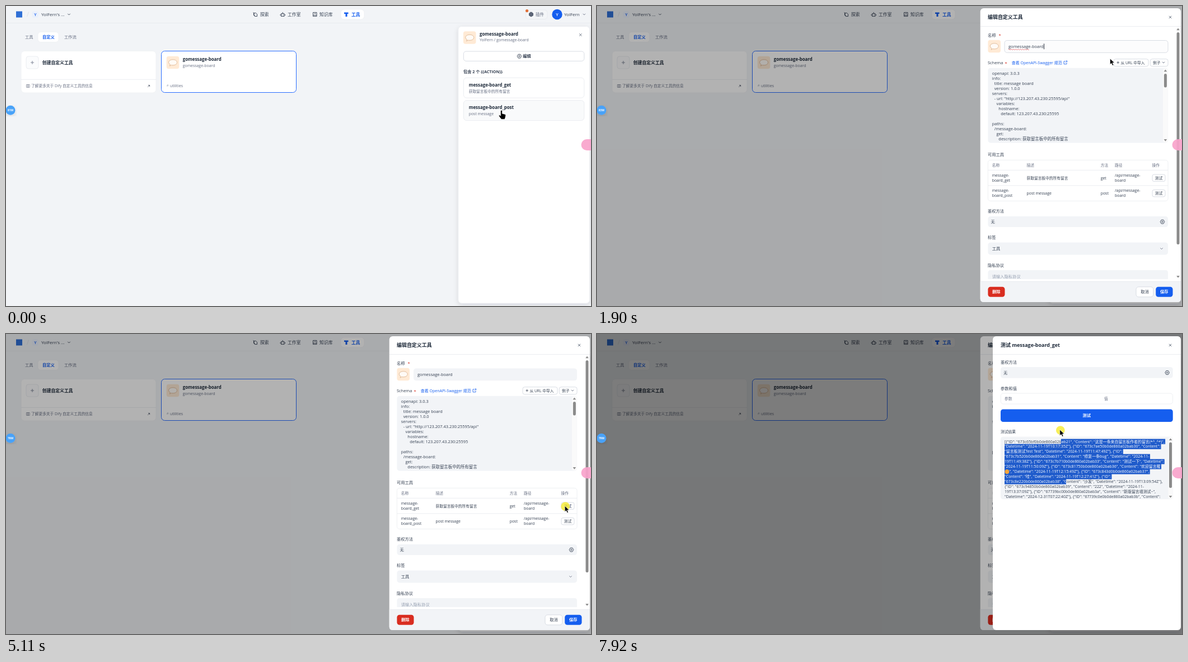
An HTML page that plays this animation: 1045x536 px, repeating every 7990 ms.

```html
<!DOCTYPE html>
<html>
<head>
<meta charset="utf-8">
<title>Custom tool test</title>
<style>
  html, body { margin: 0; width: 100%; height: 100%; overflow: hidden; background: #f2f4f7; }
  svg { position: fixed; left: 0; top: 0; display: block; }
  text { font-family: "Open Sans", "Noto Sans CJK SC", "Noto Sans CJK JP", "Noto Sans CJK", sans-serif; white-space: pre; }
</style>
</head>
<body>
<svg id="stage" width="1045" height="536" viewBox="0 0 1045 536" xmlns="http://www.w3.org/2000/svg"></svg>
<script>
const LOOP = 7990;
const INK = '#354052', DARK = '#1d2939', GRAY = '#676f83', PALE = '#a3abba';
const BLUE = '#155eef', FILL = '#f2f4f7', LINE = '#e6e9ee', EDGE = '#d0d5dd', BAR = '#8b8b8b';

// Markup helpers
const text = (x, y, s, size = 6.72, fill = INK, weight = 400, extra = '') =>
  `<text x="${x}" y="${y}" font-size="${size}" fill="${fill}" font-weight="${weight}" ${extra}>${s}</text>`;
const mid = (x, y, s, size, fill, weight) => text(x, y, s, size, fill, weight, 'text-anchor="middle"');
const box = (x1, y1, x2, y2, r = 0, fill = '#fff', stroke = 'none', extra = '') =>
  `<rect x="${x1}" y="${y1}" width="${x2 - x1}" height="${y2 - y1}" rx="${r}" fill="${fill}" stroke="${stroke}" stroke-width=".8" ${extra}/>`;
const path = (d, stroke = INK, w = 0.9, fill = 'none', extra = '') =>
  `<path d="${d}" stroke="${stroke}" stroke-width="${w}" fill="${fill}" stroke-linejoin="round" ${extra}/>`;
const dot = (x, y, r, fill, extra = '') => `<circle cx="${x}" cy="${y}" r="${r}" fill="${fill}" ${extra}/>`;
const rule = (x1, y, x2) => path(`M${x1} ${y}H${x2}`, LINE, 0.8);
const group = (id, body, extra = '') => `<g id="${id}" ${extra}>${body}</g>`;

// Small icons
const chevron = (x, y, color = INK) => path(`M${x - 2.2} ${y - 1}l2.2 2.2 2.2-2.2`, color);
const cross = (x, y) => path(`M${x - 2.2} ${y - 2.2}l4.4 4.4m0-4.4l-4.4 4.4`, '#475467', 0.8);
const gear = (x, y) =>
  path(`M${x - 1.8} ${y - 3.4}h3.6l2 3.4-2 3.4h-3.6l-2-3.4z`, INK, 0.9) + dot(x, y, 1.3, 'none', `stroke="${INK}" stroke-width=".8"`);
const bubble = (x, y) => box(x - 11.3, y - 11.3, x + 11.3, y + 11.3, 4, '#ffead5') +
  path(`M${x - 5.6} ${y + 6.2}l1-2.6c-5.4-3.2-2.6-8.8 4.6-8.8 10 0 10 10 0 10q-1.8 0-2.8-.3z`, '#d3a67f', 0.7, '#fffaf5');
const slider = (x, top, from, to, bottom) =>
  path(`M${x - 2.8} ${top + 1.8}l2.8-3.8 2.8 3.8z`, 'none', 0, BAR) +
  box(x - 2.5, from, x + 2.5, to, 2.5, BAR) +
  path(`M${x - 2.8} ${bottom - 1.8}l2.8 3.8 2.8-3.8z`, 'none', 0, BAR);

function page() {
  return box(0, 0, 1045, 536, 0, FILL) + rule(0, 30.4, 1045) +
    box(18, 9.5, 29, 20.5, 0, '#2f6fd6') +
    path('M37.5 19l3-8.5', '#d8dce4', 0.8) +
    box(46.5, 9.5, 58, 21, 3, '#eaf0fb') + mid(52.3, 17.8, 'Y', 7.2, BLUE, 600) +
    text(63, 18, 'YolFern\'s ...', 8) + chevron(112.5, 14.8) +
    path('M443 12.5h3.5l2 2v4h-4l-2-2v-4.5l-1-.5m1.5 1v3.5l2 1.5', INK) + text(454, 18, '探索', 7.84) +
    path('M491.5 13.5h5.5v5h-5.5zM494.2 13.5v-2.5M490 15v2m8.5-2v2M493 15.5v1m2.5-1v1', INK) + text(503, 18, '工作室', 7.84) +
    path('M548.5 11.5h6.5v7h-6.5zM548.5 16.5h6.5M550.5 13.5h3', INK) + text(560, 18, '知识库', 7.84) +
    box(598, 6, 640, 24, 6, '#fff', '#eceef2') +
    path('M604 11.5h7.5v2.5h-2v5h-3v-5h-2.5z', 'none', 0, BLUE) + text(617, 18, '工具', 7.84, BLUE, 700) +
    box(928.5, 7, 967, 23.5, 5, '#f4f6f8', LINE) +
    path('M934.5 13l3.5-2 3.5 2v4l-3.5 2-3.5-2zM936.5 11.5v-1m3 1v-1', INK, 0.7, '#5d6678') +
    text(946, 17.8, '插件', 7.5, GRAY) + dot(930.6, 8.6, 2.6, '#e0703a') +
    dot(984.5, 15, 9.2, BLUE) + mid(984.5, 17.8, 'Y', 7.6, '#fff', 600) +
    text(997, 18, 'YolFern', 8) + chevron(1032.8, 14.8, GRAY) +
    text(34, 58, '工具', 7.28, GRAY) + box(57, 46.5, 94, 64.5, 5, '#fff', '#eef0f3') +
    text(65, 58, '自定义', 7.28, BLUE, 600) + text(104, 58, '工作流', 7.28, GRAY) +
    box(27, 80.5, 268, 155, 6, '#fff', '#eef0f3') + rule(27, 131.3, 268) +
    box(36, 90, 58, 112, 4, '#fbfcfd', LINE) + path('M44 101h6m-3-3v6', GRAY, 0.8) +
    text(64.8, 103.7, '创建自定义工具', 7.84, DARK, 700) +
    path('M36.5 140.5h2.8v4.8h-2.8zM39.3 140.5h2.8v4.8h-2.8z', GRAY, 0.7) +
    text(45, 145.4, '了解更多关于 Dify 自定义工具的信息', 6.72, GRAY) +
    path('M253.3 144.8l3.3-3.3m-2.6 0h2.6v2.6', INK, 0.7) +
    box(277.5, 80.5, 518.5, 154.5, 6, '#fff', '#296dff', 'style="stroke-width:1"') +
    bubble(298, 101) + text(315.7, 98, 'gomessage-board', 7.9, DARK, 700) +
    text(315.7, 108.5, 'gomessage-board', 6.92, GRAY) +
    text(286.8, 144.2, '#', 6, PALE) + text(293, 144.5, 'utilities', 6.85, GRAY);
}

const toolRow = (id, y, name, note) => box(817.4, y, 1032.8, y + 36, 5.5, '#fff', LINE, `id="${id}"`) +
  text(826.7, y + 15.7, name, 7.9, DARK, 700) + text(826.7, y + 26.4, note, /^p/.test(note) ? 6.92 : 6.72, GRAY);

function detail() {
  return box(808, 36.5, 1042.5, 531, 6, '#fff', '#eceef2', 'filter="url(#soft)"') +
    bubble(828.2, 56.5) + text(846, 53, 'gomessage-board', 7.9, DARK, 700) +
    text(846, 63.4, 'YolFern / gomessage-board', 6.92, GRAY) + cross(1026.3, 51.5) +
    box(817.4, 81, 1032.8, 98.4, 4.5, '#fff', EDGE, 'id="edit"') + gear(917, 89.7) +
    text(923.2, 92.4, '编辑', 7.28, INK, 700) +
    text(817, 119.6, '包含 2 个 {{ACTION}}', 7.2, INK, 700) +
    toolRow('rowGet', 128.2, 'message-board_get', '获取留言板中的所有留言') +
    toolRow('rowPost', 168.6, 'message-board_post', 'post message');
}

const schema = `openapi: 3.0.3
info:
  title: message board
  version: 1.0.0
servers:
  - url: "http://123.207.43.230:25595/api"
    variables:
      hostname:
        default: 123.207.43.230:25595

paths:
  /message-board:
    get:
      description: 获取留言板中的所有留言`.split('\n');

const tableRow = (y, verb, note) =>
  text(705.7, y - 2.5, 'message-', 6.92) + text(705.7, y + 6.7, 'board_' + verb, 6.92) +
  text(767.5, y + 2.4, note, /^p/.test(note) ? 6.92 : 6.72) + text(899.7, y + 2.3, verb, 6.92) +
  text(925, y - 2.5, '/api/message-', 6.92) + text(925, y + 6.7, 'board', 6.92) +
  box(992, y - 6.2, 1015, y + 6.2, 3, '#fff', EDGE) + text(996.7, y + 2.4, '测试', 6.72);

function editor() {
  let wave = 'M735 77.8';
  for (let i = 0; i < 18; i++) wave += `q.5 ${i % 2 ? 1.3 : -1.3} 2.05 0`;
  const heads = [[705.7, '名称'], [767.5, '描述'], [899.7, '方法'], [925, '路径'], [991.5, '操作']];
  return box(684.7, 4, 1043, 529, 6, '#fff') +
    text(698, 23.4, '编辑自定义工具', 8.96, DARK, 700) + cross(1024, 20) + rule(685, 36.5, 1043) +
    text(698, 54.6, '名称', 7.28) + text(717.5, 55, '*', 7.5, '#d92d20') +
    bubble(709.7, 72) +
    box(728, 61.5, 1020, 83.3, 4.5, '#fcfcfd', EDGE, 'id="nameBox"') +
    text(735, 75, 'gomessage-board', 7.5) + path(wave, '#e5484d', 0.7, 'none', 'id="wave"') +
    box(798, 67.3, 798.9, 77.2, 0, '#101828', 'none', 'id="caret"') +
    text(698, 104, 'Schema', 7.45) + text(728.5, 104.5, '*', 7.5, '#d92d20') +
    text(740.7, 103.8, '查看 OpenAPI-Swagger 规范', 7, BLUE) +
    path('M836.5 98.8h-2.5v5h5v-2.5M836.5 101.2l3.2-3.2m-2.2 0h2.2v2.2', BLUE, 0.8) +
    box(923, 94.7, 985, 107.8, 3.5, '#fff', EDGE) + path('M928.5 101h4.4m-2.2-2.2v4.4', INK, 0.8) +
    text(935.5, 103.6, '从 URL 中导入', 6.72) +
    box(988.3, 94.7, 1020, 107.8, 3.5, '#fff', EDGE) + text(993, 103.6, '例子', 6.72) + chevron(1012, 100.8, GRAY) +
    box(698.4, 110.8, 1020.2, 244.4, 4.5, FILL, 'none', 'id="area"') + box(1011, 111.4, 1019.8, 243.8, 3, '#fafafa') +
    slider(1015.4, 115.5, 121, 145.5, 239.8) +
    schema.map((s, i) => text(705.8, 122.6 + 9 * i, s, 7.43)).join('') +
    text(698, 268.4, '可用工具', 7.28) +
    box(698.4, 275.3, 1020, 348.4, 4.5, '#fff', '#eaecf0') +
    heads.map(([x, s]) => text(x, 286.6, s, 6.72, GRAY)).join('') +
    rule(698.4, 293.3, 1020) + rule(698.4, 320.8, 1020) +
    tableRow(307.2, 'get', '获取留言板中的所有留言') + tableRow(334.6, 'post', 'post message') +
    text(698, 369.2, '鉴权方法', 7.28) + box(698.4, 375.8, 1020, 395, 4.5, FILL) +
    text(703.5, 388.1, '无', 7.28) + gear(1010, 385.5) +
    text(698, 416, '标签', 7.28) + box(698.4, 422.5, 1020, 444.4, 4.5, FILL) +
    text(705.8, 436.3, '工具', 7.28) + chevron(1008.5, 433.3, GRAY) +
    text(698, 465.5, '隐私协议', 7.28) +
    path('M698.4 488v-11.5q0-4.5 4.5-4.5h312.6q4.5 0 4.5 4.5v11.5z', 'none', 0, FILL) +
    text(705.8, 485.6, '请输入隐私协议', 7.28, '#98a2b3') +
    slider(1038, 41.5, 47, 426, 483.8) +
    path('M684.7 492h358.3v31q0 6-6 6h-346.3q-6 0-6-6z', 'none', 0, FILL) + rule(685, 492.2, 1043) +
    box(698.4, 501.8, 728.5, 519.8, 4.5, '#d92d20') + text(706, 513.4, '删除', 7.28, '#fff', 600) +
    box(963, 501.8, 993.8, 519.8, 4.5, '#fff', EDGE) + text(971.2, 513.4, '取消', 7.28) +
    box(998.2, 501.8, 1028.5, 519.8, 4.5, BLUE) + text(1006, 513.4, '保存', 7.28, '#fff', 600);
}

const answer = `[{"ID": "673c65bf0b0de860a02bab21", "Content": "这是一条来自留言板作者的留言(*^_^*)",
"Datetime": "2024-11-19T10:17:35Z"}, {"ID": "673c7ae50b0de860a02bab30", "Content":
"留言板测试Test Test", "Datetime": "2024-11-19T11:47:49Z"}, {"ID":
"673c7b520b0de860a02bab31", "Content": "修复一条bug", "Datetime": "2024-11-
19T11:49:38Z"}, {"ID": "673c7b710b0de860a02bab33", "Content": "测试一下", "Datetime":
"2024-11-19T11:50:09Z"}, {"ID": "673c81750b0de860a02bab36", "Content": "欢迎留言喔
", "Datetime": "2024-11-19T12:15:49Z"}, {"ID": "673c843d0b0de860a02bab37",
"Content": "哇", "Datetime": "2024-11-19T12:27:41Z"}, {"ID":
"673c8e220b0de860a02bab38", "Content": "沙发", "Datetime": "2024-11-19T13:09:54Z"},
{"ID": "673c94850b0de860a02bab39", "Content": "222", "Datetime": "2024-11-
19T13:37:09Z"}, {"ID": "67739bc00b0de860a02bab3a", "Content": "新版留言墙测试~",
"Datetime": "2024-12-31T07:22:40Z"}, {"ID": "67739c0e0b0de860a02bab3b", "Content":`.split('\n');
const SMILEY = 6, LEFT = 728, TOP = 187.6, PITCH = 8.97;
const answerText = fill => answer.map((s, i) =>
  text(i === SMILEY ? 736.6 : LEFT, 194.5 + PITCH * i, s, 6.93, fill)).join('');

function tester() {
  return box(707, 4, 1043, 529, 6, '#fff') +
    text(721, 23.4, '测试 message-board_get', 8.96, DARK, 700) + cross(1024, 20) + rule(707, 36.5, 1043) +
    text(721, 52.5, '鉴权方法', 7.28) + box(721, 59, 1028.7, 78.8, 4.5, FILL) +
    text(726, 71.5, '无', 7.28) + gear(1018.6, 69) +
    text(721, 99.6, '参数和值', 7.28, INK, 500) + box(721.3, 106, 1028.5, 125, 4.5, '#fff', '#eaecf0') +
    text(728, 117.6, '参数', 6.72, GRAY) + text(906, 117.6, '值', 6.72, GRAY) +
    box(721, 134.4, 1028.7, 157, 4.5, BLUE, 'none', 'id="run"') + text(867.6, 148.4, '测试', 7.28, '#fff', 700) +
    text(721, 176.7, '测试结果', 6.72) + box(721, 183.4, 1028.7, 295.3, 4.5, FILL) +
    text(727.8, 194.6, '测试结果将显示在这里', 6.72, PALE, 400, 'id="hint"') +
    group('result', answerText(INK) +
      path('', 'none', 0, '#1f5bcb', 'id="mark"') +
      group('picked', answerText('#fff'), 'clip-path="url(#span)"') +
      dot(732.4, 246, 3.9, '#f3a43b') +
      box(1020.5, 184, 1028.4, 294.8, 3, '#fafafa') + slider(1024.5, 188.3, 193.5, 275, 290.8),
      'clip-path="url(#view)"');
}

const pointers =
  group('arrow', path('M0 0v10.6l2.5-2.3 1.8 4 1.9-.9-1.8-3.9h3.4z', '#fff', 0.6, '#000')) +
  group('hand', path('M-1.4 .2q1.4-1.9 2.8 0v5l5 1.2q1.4.4 1.2 2.2-.4 3.8-1.7 6.7h-6.1q-2.6-3-4.4-6 0-1.8 1.7-1.3l1.5 1.3z', '#fff', 0.6, '#000')) +
  group('beam', path('M-2.6-5.2h1.8l.8.6.8-.6h1.8M-2.6 5.2h1.8l.8-.6.8.6h1.8M0-4.6v9.2', '#000', 1.3));

const shade = box(0, 0, 1045, 536, 0, 'rgba(0,0,0,.3)');
document.getElementById('stage').innerHTML = `<defs>
  <filter id="soft" x="-10%" y="-10%" width="120%" height="120%"><feDropShadow dx="0" dy="3" stdDeviation="4" flood-color="#101828" flood-opacity=".12"/></filter>
  <clipPath id="view">${box(721, 183.4, 1028.7, 295.3)}</clipPath>
  <clipPath id="span"><path id="spanPath"/></clipPath></defs>` +
  page() + detail() + group('editor', shade + editor()) + group('tester', shade + tester()) +
  dot(8, 186.2, 8.5, '#4aa2f8', 'filter="url(#soft)"') + mid(8, 188, '81M', 4.9, '#fff', 700).replace('<text', '<text id="memory"') +
  path('M1045 238h-7.5a10 10 0 0 0 0 20h7.5z', 'none', 0, '#f9a3cb', 'opacity=".92"') +
  dot(0, 0, 7.8, '#f4ea20', 'id="press" opacity=".75"') + group('cursor', pointers);

const el = {};
document.querySelectorAll('[id]').forEach(n => el[n.id] = n);
const show = (name, on) => el[name].setAttribute('visibility', on ? 'inherit' : 'hidden');
const paint = (name, fill, stroke) => {
  el[name].setAttribute('fill', fill);
  if (stroke) el[name].setAttribute('stroke', stroke);
};

// Bursts of activity: start, end, number of steps
const bursts = [[260, 400, 3], [610, 670, 2], [870, 1650, 12], [1700, 2450, 12], [2520, 3250, 12], [3320, 3680, 6],
  [3870, 4620, 12], [4700, 4780, 2], [4970, 5180, 4], [5380, 6100, 11], [6300, 6300, 1], [6790, 7580, 11], [7640, 7920, 5]];
function stepped(t) {
  let now = 0;
  for (const [from, to, n] of bursts) {
    if (t < from) break;
    const gap = (to - from) / (n - 1) || 1;
    now = Math.min(to, from + Math.floor((t - from + 6) / gap) * gap);
  }
  return now;
}

// Pointer path: time, x, y
const route = [[0, 885, 187], [260, 883, 182], [400, 876, 192], [610, 880, 181], [670, 892, 200], [870, 891, 202],
  [1100, 894, 180], [1400, 908, 125], [1650, 917, 95], [1830, 917, 94], [1970, 916, 94], [2450, 900, 99],
  [2800, 862, 116], [3250, 840, 139], [3320, 842, 140], [3680, 886, 171], [3870, 890, 176], [4150, 925, 262],
  [4410, 975, 349], [4620, 995, 315], [4700, 996, 313], [4780, 998.5, 308.5], [5380, 998, 306], [5700, 940, 230],
  [5950, 884, 156], [6030, 877, 150], [6790, 877, 150], [6860, 876, 152], [7250, 850, 210], [7580, 838, 250],
  [7640, 838, 263], [7710, 838, 255], [7780, 836, 232], [7850, 831, 198], [7920, 826.8, 171]];
function pointerAt(t) {
  const i = route.findIndex(k => k[0] > t);
  if (i < 0) return route[route.length - 1].slice(1);
  const [t0, x0, y0] = route[i - 1], [t1, x1, y1] = route[i];
  const p = (t - t0) / (t1 - t0);
  return [x0 + (x1 - x0) * p, y0 + (y1 - y0) * p];
}

const presses = [[1690, 1830], [4960, 5170], [5940, 6090], [7630, LOOP]];
const within = (v, a, b) => v >= a && v < b;

const rows = [...el.picked.children];
const lineEnd = i => +rows[i].getAttribute('x') + rows[i].getComputedTextLength() + 1.5;
function selection(x, y) {
  const last = 8, anchor = 838;
  const first = Math.max(0, Math.min(last, Math.floor((y - TOP) / PITCH)));
  let d = '';
  for (let i = first; i <= last; i++) {
    const a = i === first ? x : LEFT, b = i === last ? anchor : lineEnd(i);
    d += `M${a} ${TOP + PITCH * i}H${b}v${PITCH + 0.1}H${a}z`;
  }
  return d;
}

function draw(time) {
  const t = stepped(time), [x, y] = pointerAt(t);
  const screen = t < 1890 ? 0 : t < 5175 ? 1 : 2;
  const focused = screen === 1 && t < 4960;
  const overGet = !screen && within(y, 128, 164.3), overPost = !screen && within(y, 168.5, 204.6);
  const overArea = screen === 1 && within(y, 111, 244) && x < 1011;
  const overRun = screen === 2 && within(y, 134, 157);
  const overResult = screen === 2 && within(y, 183, 295);

  show('editor', screen > 0);
  show('tester', screen > 1);
  paint('edit', !screen && within(y, 81, 98.5) ? '#f6f7f9' : '#fff');
  paint('rowGet', overGet ? '#f9fafb' : '#fff');
  paint('rowPost', overPost ? '#f9fafb' : '#fff');
  paint('nameBox', focused ? '#fcfcfd' : FILL, focused ? EDGE : 'none');
  paint('area', overArea ? '#f9fafb' : FILL, overArea ? EDGE : 'none');
  paint('run', overRun ? '#004aeb' : BLUE);
  show('wave', focused);
  show('caret', focused && Math.floor((t - 1900) / 530) % 2 === 0);

  const done = screen === 2 && t >= 6300, drag = t >= 7630;
  show('hint', screen === 2 && !done);
  show('result', done);
  const d = drag ? selection(x + 2, y) : '';
  el.mark.setAttribute('d', d);
  el.spanPath.setAttribute('d', d);

  el.memory.textContent = t < 1690 ? '81M' : t < 2720 ? '83M' : t < 6785 ? '78M' : '79M';

  const shape = overGet || overPost || overRun ? 'hand' : overArea || overResult ? 'beam' : 'arrow';
  for (const s of ['arrow', 'hand', 'beam']) show(s, s === shape);
  el.cursor.setAttribute('transform', `translate(${x} ${y})`);
  el.press.setAttribute('transform', `translate(${x + 1} ${y + 1})`);
  show('press', presses.some(([a, b]) => within(t, a, b)));
}

const begin = performance.now();
function tick() {
  draw((performance.now() - begin) % LOOP);
  requestAnimationFrame(tick);
}
tick();
</script>
</body>
</html>
```
